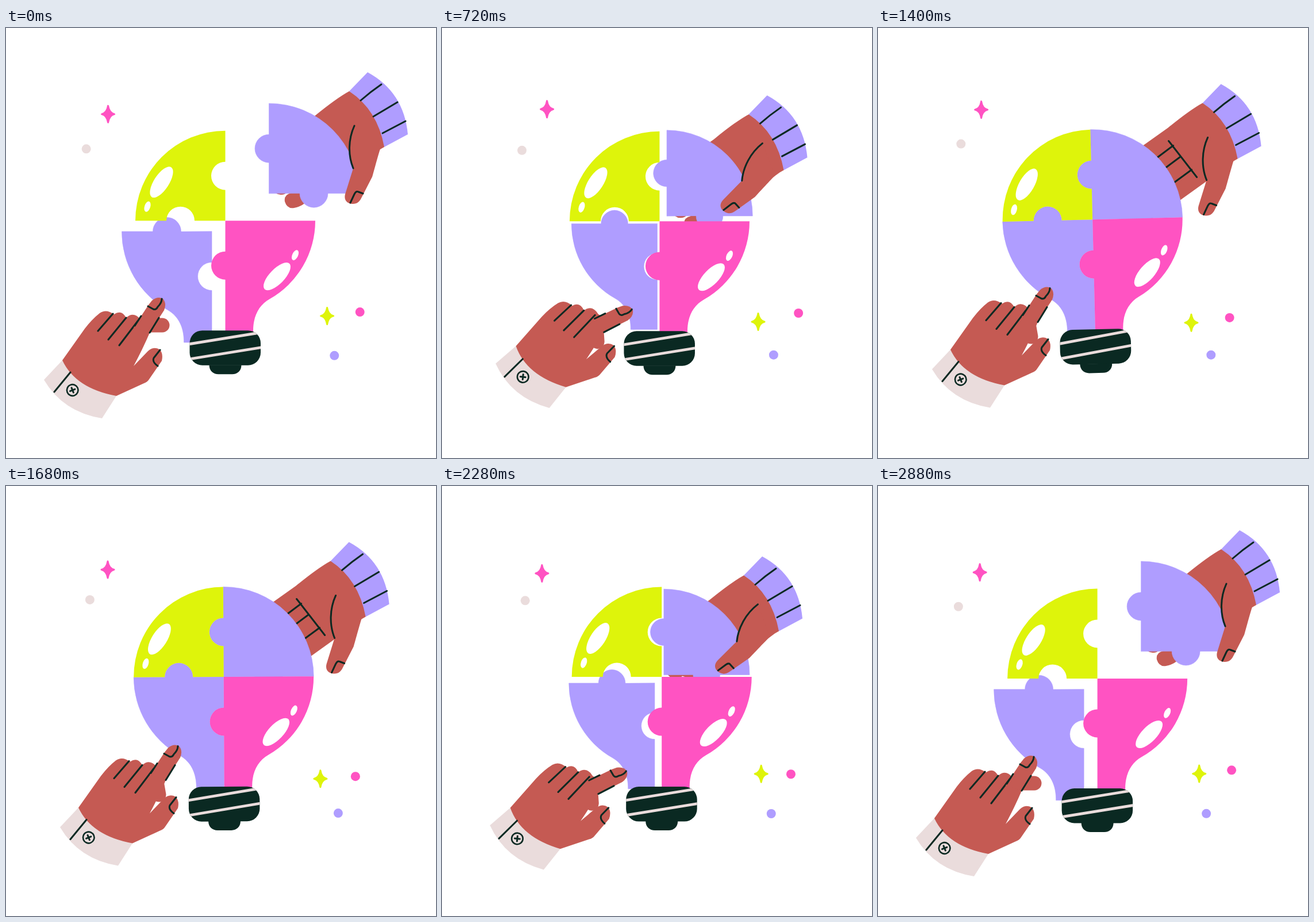
An HTML page for the animation above (2.92 s loop, 748 px wide and 748 px high).

```html
<!DOCTYPE html>
<html lang="en">
<head>
<meta charset="utf-8">
<title>Puzzle bulb</title>
<style>
html, body { margin: 0; height: 100%; overflow: hidden; background: #fff; }
svg { display: block; width: 100%; height: 100%; }
</style>
</head>
<body>
<svg id="stage" viewBox="0 0 748 748"></svg>
<script>
const LOOP = 2920, STEP = 40;
const SKIN = '#c55a53', PURPLE = '#af9dff', LIME = '#def40b',
      PINK = '#ff53c2', INK = '#0a2922', BEIGE = '#eadcdc';
const stage = document.getElementById('stage');

// Timing
const ramp = (t, from, to) => {
  const u = Math.min(1, Math.max(0, (t - from) / (to - from)));
  return u * u * (3 - 2 * u);
};
const hold = (t, in0, in1, out0, out1) => ramp(t, in0, in1) - ramp(t, out0, out1);
// One slow swing per loop, furthest out at the given phase in degrees
const swing = (t, size, phase) => size * Math.cos(2 * Math.PI * (t / LOOP - phase / 360));

// Drawing
const fill = (d, color) => `<path d="${d}" fill="${color}"/>`;
const line = (d, color = INK, width = 3) =>
  `<path d="${d}" fill="none" stroke="${color}" stroke-width="${width}" stroke-linecap="round" stroke-linejoin="round"/>`;
const group = (transform, ...parts) => `<g transform="${transform}">${parts.join('')}</g>`;
const move = (x, y, ...parts) => group(`translate(${x} ${y})`, ...parts);
const turn = (angle, x, y, ...parts) => group(`rotate(${angle} ${x} ${y})`, ...parts);
const oval = (x, y, rx, ry, angle) =>
  `<ellipse rx="${rx}" ry="${ry}" fill="#fff" transform="translate(${x} ${y}) rotate(${angle})"/>`;
const shine = (x, y, angle) => oval(x, y, 31, 13, angle);
const glint = (x, y, angle) => oval(x, y, 9.5, 5, angle);

// Bulb parts, around the point where the four pieces meet
const RIM = 'A156.5 156.5 0 0 ', KNOB = 'A24.5 24.5 0 0 ';
const topLeft = `M0 0V-53.5${KNOB}1 0 -102.5V-156.5${RIM}0 -156.5 0H-102.5${KNOB}1 -53.5 0Z`;
const topRight = `M0 0V-53.5${KNOB}1 0 -102.5V-156.5${RIM}1 156.5 0H102.5${KNOB}1 53.5 0Z`;
const bottomRight = `M0 0H156.5${RIM}1 77 136.3C58 147 48 167 48.5 193H0V102.5${KNOB}1 0 53.5Z`;
const bottomLeft = `M0 0V53.5${KNOB}0 0 102.5V193H-48.5C-48 167 -58 147 -77 136.3${RIM}1 -156.5 0H-102.5${KNOB}1 -53.5 0Z`;

const glass = fill(topLeft, LIME) + fill(bottomRight, PINK);
const shines = shine(-111, -67, -57) + glint(-135.5, -24.5, -72)
  + shine(90, 97, -46) + glint(121.5, 60, -65);
const cap = '<clipPath id="cap"><rect x="-62" y="191" width="123.5" height="60.5" rx="22"/></clipPath>'
  + `<g clip-path="url(#cap)">${fill('M-70 185H70V260H-70Z', INK)}`
  + line('M-68 215.5l136 -22M-68 241.6l136 -22', BEIGE, 4.8) + '</g>'
  + fill('M-28 251H28C28 261 21 267 12 267H-12C-21 267 -28 261 -28 251Z', INK);

// Scaled about the middle of the piece; a hairline outline closes the seams
const piece = (d, x, y, cx, cy, scale) =>
  group(`translate(${x + cx} ${y + cy}) scale(${scale}) translate(${-cx} ${-cy})`,
    fill(d, PURPLE), line(d, PURPLE, 0.6));

// Right hand: fixed back and a thumb that swings over the piece
const rightBack = fill('M629 77Q692 111 699 185L658 207L597 110Z', PURPLE)
  + fill('M597 110Q575 122 537 153L492 185L465 215L462 278Q468 290 478 290Q486 290 490 285'
    + 'L496 287Q483 290 485 302Q489 315 501 313Q508 312 515 308L558 279L604 246L651 211L658 207Q646 142 597 110Z', SKIN)
  + line('M617 126Q634 111 653 98M639 154L681 129M655 183L695 162')
  + line('M538 176L587 239M546 184l-28 21M559 203l-28 21M578 226l-30 22');
const crease = 'M606 170C595 194 595 222 604 244';
const thumb = fill(crease + 'L590 289C587 301 595 306 603 306C611 306 615 302 618 296L637 259C640 249 646 226 651 210Z', SKIN)
  + line(crease + 'M599 304L606 289Q609 283 613 285L621 288');

// Left hand: the whole hand tips a little, the pointing finger bends further
const palm = fill('M66 612L98 578L192 640L167 679Q99 668 66 612Z', BEIGE)
  + fill('M98 578L137 523Q150 506 163 496Q174 488 188 498Q201 489 209 504Q222 492 234 507'
    + 'L250 530Q238 558 222 588L246 563Q256 553 267 559Q274 566 271 579L249 611Q246 616 240 618L192 640Q121 627 98 578Z', SKIN)
  + line('M112 599L84 633M186 497L160 527M209 504L178 542M229 510L197 552M268 560L257 574Q254 581 264 588');
const pointer = fill('M222 521L248 481.5L254 474Q264 466 273 471Q280 479 275 491L250 530Z', SKIN)
  + line('M224 518L235 501M266 504L250 530M247 484L256 489Q261 491 264 485Q271 478 271 471');
const curled = line('M236 517H272', SKIN, 25);
const button = `<circle r="9.8" fill="none" stroke="${INK}" stroke-width="2.6"/>` + line('M-4.5 0H4.5M0 -4.5V4.5');

const leftHand = (bend, tuck) => turn(6 * bend, 158, 600,
  turn(80 * tuck, 232, 516, curled), palm, turn(25 * bend, 231, 529, pointer),
  move(115.7, 630, turn(-22 * (1 - bend), 0, 0, button)));

// Floating bits: centre, then size and phase of the swing on each axis
const starPath = 'M0 -14.5Q2 -2 11 0Q2 2 0 14.5Q-2 2 -11 0Q-2 -2 0 -14.5Z';
const star = color => fill(starPath, color) + line(starPath, color, 3);
const dot = color => `<circle r="8" fill="${color}"/>`;
const bits = [
  [star(PINK), 178.3, 146.3, 4.4, 100, 6.2, 305],
  [star(LIME), 551.9, 506.5, 7, 343, 7.3, 140],
  [dot(BEIGE), 142.2, 205.5, 4, 230, 8.7, 56],
  [dot(PINK), 613.2, 499.2, 7.3, 70, 6, 211],
  [dot(PURPLE), 575.2, 569.3, 4.3, 156, 0.8, 310],
];

function draw(t) {
  const push = hold(t, 400, 720, 2120, 2520);
  const away = hold(t, 840, 1120, 1960, 2200);
  const carry = hold(t, 390, 810, 2280, 2690);
  const reach = carry - 0.55 * away;
  const press = hold(t, 40, 320, 760, 1000) + hold(t, 1960, 2200, 2480, 2800);
  const grip = hold(t, 180, 780, 2300, 2800) - away;
  const tuck = hold(t, 80, 320, 2480, 2800);
  const tilt = -1.4 * hold(t, 1040, 1400, 1400, 1800);
  const scale = 1 - 0.047 * press;
  const apart = 1 - carry, below = 1 - push;
  const rightX = -72 * reach, rightY = 45.5 * reach;

  stage.innerHTML =
    bits.map(([shape, x, y, w, px, h, py]) => move(x + swing(t, w, px), y + swing(t, h, py), shape)).join('')
    + move(rightX, rightY, rightBack)
    + move(380.2 + swing(t, 2.2, 306), 334 + swing(t, 2.5, 62),
      turn(tilt, 0, 225,
        piece(topRight, 76 * apart, -47.5 * apart, 78, -78, scale),
        piece(bottomLeft, -23.5 * below, 18.8 * below, -85, 90, scale),
        glass, turn(1.2 * tilt, 0, 0, shines), cap))
    + move(rightX, rightY, turn(28 * grip, 633, 196, thumb))
    + move(28 * push, -18.5 * push, leftHand(press, tuck));
}

function tick() {
  draw(Math.floor(performance.now() % LOOP / STEP) * STEP);
  requestAnimationFrame(tick);
}
tick();
</script>
</body>
</html>
```
